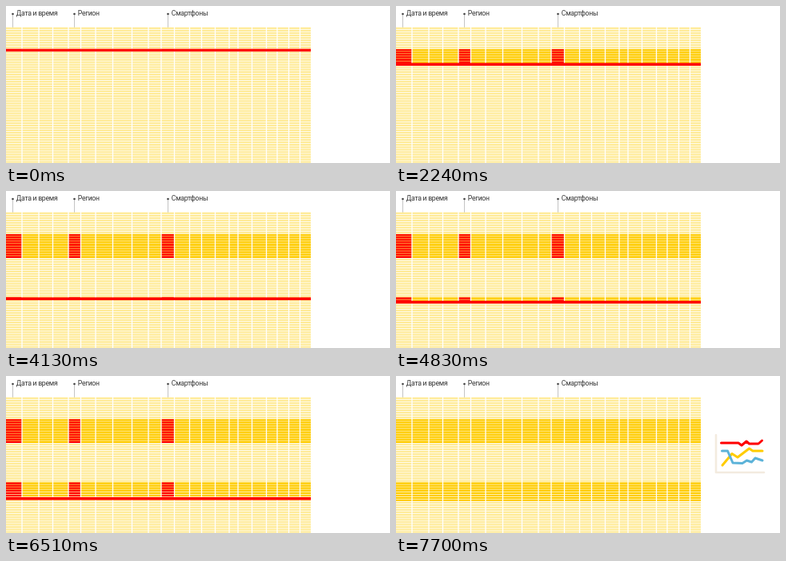
An HTML page that plays this animation: 480 by 197 pixels, repeating every 8050 ms.

```html
<!DOCTYPE html>
<html lang="ru">
<head>
<meta charset="utf-8">
<style>
  html, body { margin: 0; width: 100%; height: 100%; overflow: hidden; background: #fff; }
  svg { display: block; }
  text { font: 8.7px Roboto, "Open Sans", sans-serif; letter-spacing: -.28px; fill: #333; }
  #chart { fill: none; stroke-width: 3; stroke-linecap: round; stroke-linejoin: round; }
</style>
</head>
<body>
<svg width="480" height="197" viewBox="0 0 480 197">
  <defs>
    <clipPath id="clip0"><rect id="reveal0" y="53" width="381"/></clipPath>
    <clipPath id="clip1"><rect id="reveal1" y="133" width="381"/></clipPath>
  </defs>
  <g id="labels"></g>
  <path id="rows" fill="#ffeb99"/>
  <g clip-path="url(#clip0)"><path id="band0" fill="#fc0"/><path id="cells0" class="cells" fill="#f00"/></g>
  <g clip-path="url(#clip1)"><path id="band1" fill="#fc0"/><path id="cells1" class="cells" fill="#f00"/></g>
  <path id="columns" stroke="#fff" stroke-width="1.3"/>
  <rect id="scanner" width="381" height="3.5" fill="#f00"/>
  <g id="chart">
    <path d="M400 74V121H460" stroke="#f3ebdf" stroke-width="2.6"/>
    <path d="M406.5 84H428L432 87L438 82L441.5 85H453L457.5 81" stroke="#f00"/>
    <path d="M408 112L420 97.5L427 102L441.5 91L446 94H458" stroke="#fc0"/>
    <path d="M407.5 94H414.5L421 109L433 109.5L438.5 106L444.5 108L449 103L458 106" stroke="#5cb3d9"/>
  </g>
</svg>
<script>
const LOOP = 8050, STEP = 70;
const TOP = 26.7, PITCH = 3.05, ROW = 2.3, WIDTH = 381;
const COLUMNS = [20, 41, 58.5, 78, 93.5, 112, 133.5, 157.5, 178, 194, 210.5,
  229.5, 244.5, 261.5, 279, 290, 307.5, 325.5, 339, 353.5, 367.5];
const CELLS = [[0, 20], [78, 93.5], [194, 210.5]];
const BANDS = [[9, 10], [35, 8]]; // first row, number of rows

// [time, value]; equal times make a hard jump
const LINE_Y = [[0, 53.7], [350, 53.7], [1190, 62.8], [2030, 69.2], [2310, 72.2], [2380, 72.2],
  [2940, 81.2], [4130, 81.2], [4130, 133.5], [4270, 133.5], [5110, 139.9], [5530, 145.9],
  [5600, 145.9], [6230, 150.9], [6370, 150.9], [6510, 152.1], [6580, 154.9], [6720, 154.9],
  [7000, 158.2]];
const LINE_ALPHA = [[0, .92], [210, 1], [6720, 1], [7000, 0]];
const RESULT_ALPHA = [[7420, 0], [7700, 1]];

const el = id => document.getElementById(id);

function rowsPath(first, count, x0 = 0, x1 = WIDTH) {
  let d = '';
  for (let i = first; i < first + count; i++) d += `M${x0} ${TOP + i * PITCH}H${x1}v${ROW}H${x0}z`;
  return d;
}

function valueAt(keys, t) {
  const next = keys.findIndex(key => key[0] > t);
  if (next === 0) return keys[0][1];
  if (next < 0) return keys[keys.length - 1][1];
  const [t0, v0] = keys[next - 1], [t1, v1] = keys[next];
  return v0 + (v1 - v0) * (t - t0) / (t1 - t0);
}

el('labels').innerHTML = [[8.5, 'Дата и время'], [85.5, 'Регион'], [202.5, 'Смартфоны']].map(([x, label]) =>
  `<path d="M${x} 10V27" stroke="#c4c4c4"/><circle cx="${x}" cy="10" r="1.3" fill="#444"/>
   <text x="${x + 4.3}" y="12">${label}</text>`).join('');
el('rows').setAttribute('d', rowsPath(0, 56));
el('columns').setAttribute('d', COLUMNS.map(x => `M${x} 26V197`).join(''));
BANDS.forEach(([first, count], i) => {
  el('band' + i).setAttribute('d', rowsPath(first, count));
  el('cells' + i).setAttribute('d', CELLS.map(([a, b]) => rowsPath(first, count, a, b)).join(''));
});

function draw(now) {
  const t = Math.floor(now % LOOP / STEP) * STEP;
  const y = valueAt(LINE_Y, t), edge = y + 1.75;
  const result = valueAt(RESULT_ALPHA, t);
  el('scanner').setAttribute('y', y);
  el('scanner').setAttribute('opacity', valueAt(LINE_ALPHA, t));
  el('reveal0').setAttribute('height', Math.min(edge, 85) - 53);
  el('reveal1').setAttribute('height', Math.max(edge - 133, 0));
  el('chart').setAttribute('opacity', result);
  document.querySelectorAll('.cells').forEach(cells => cells.setAttribute('opacity', 1 - result));
}

const start = performance.now();
function tick() {
  draw(performance.now() - start);
  requestAnimationFrame(tick);
}
tick();
</script>
</body>
</html>
```
